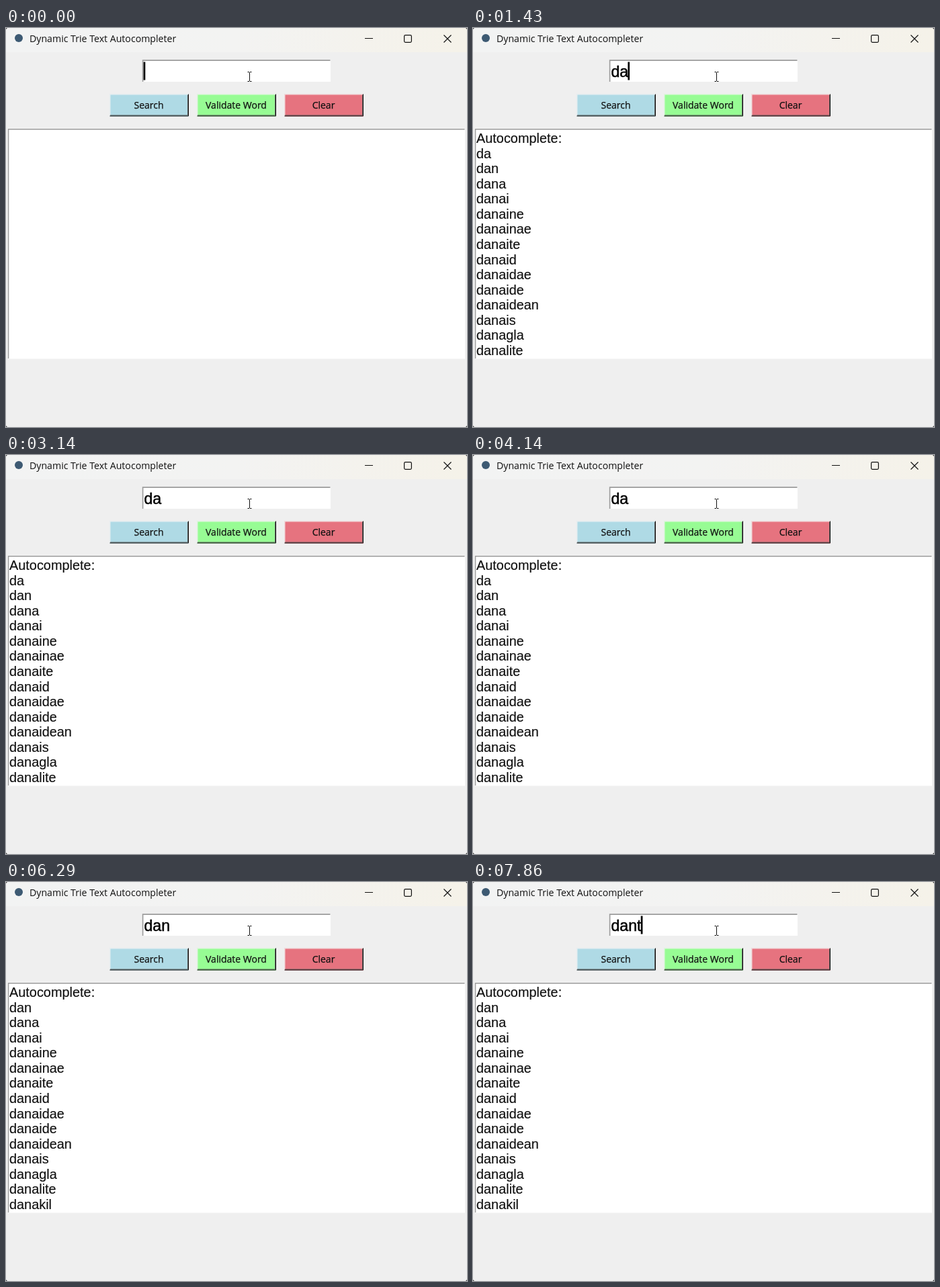
Recreate the animation shown at these times as an HTML page. Size 686 by 594 pixels, loop 8000 ms.

```html
<!DOCTYPE html>
<html lang="en">
<head>
<meta charset="utf-8">
<title>Dynamic Trie Text Autocompleter</title>
<style>
  html, body { margin: 0; width: 100%; height: 100%; overflow: hidden; background: #efefef; }
  svg { display: block; width: 686px; height: 594px; }
  text { white-space: pre; }
  .ui { font: 14.15px "Open Sans", "Noto Sans", sans-serif; fill: #111; }
  .button { font-size: 14px; text-anchor: middle; stroke: #111; stroke-width: .25; }
  .typed { font: 23.2px "Liberation Sans", Arial, sans-serif; stroke: #000; stroke-width: .5; }
  .list { font: 19.9px "Liberation Sans", Arial, sans-serif; fill: #111; stroke: #111; stroke-width: .15; }
  .line { fill: none; stroke: #111; stroke-width: 1.2; }
</style>
</head>
<body>
<svg viewBox="0 0 686 594">
  <defs>
    <linearGradient id="bar">
      <stop offset="0" stop-color="#f2f3f3"/>
      <stop offset=".5" stop-color="#f3f3f2"/>
      <stop offset="1" stop-color="#f5f2e9"/>
    </linearGradient>
  </defs>
  <rect width="686" height="594" fill="#efefef"/>
  <rect width="686" height="36" fill="url(#bar)"/>
  <path d="M0 592v2h2zM686 592v2h-2zM0 0h2l-2 2zM686 0h-2l2 2z" fill="#444"/>

  <circle cx="19" cy="15" r="6" fill="#3d5a73"/>
  <text class="ui" x="35" y="21">Dynamic Trie Text Autocompleter</text>
  <path class="line" d="M534 15.5h12M651.5 10.5l11 11M662.5 10.5l-11 11"/>
  <rect class="line" x="592.6" y="10.6" width="10.8" height="10.8" rx="1.8"/>

  <rect x="203" y="47" width="280" height="33" fill="#fff"/>
  <path d="M203.6 80V48.1H482.5" fill="none" stroke="#9a9a9a" stroke-width="1.6"/>
  <text id="typed" class="typed" x="205.4" y="72.6"></text>
  <rect id="caret" y="50.5" width="2.7" height="27"/>

  <g id="buttons"></g>

  <rect x="3" y="150" width="680" height="342.5" fill="#fff"/>
  <path d="M3.6 492V150.8H682.5" fill="none" stroke="#9c9c9c" stroke-width="1.4"/>
  <g id="list"></g>

  <path d="M359.5 65.5h2.5m1 0h2.5M362.5 66v13M359.5 79.5h2.5m1 0h2.5" fill="none" stroke="#111"/>
</svg>
<script>
const LOOP = 8000;
const byId = id => document.getElementById(id);
const typed = byId("typed"), caret = byId("caret"), list = byId("list");

const stem = "da dan dana danai danaine danainae danaite danaid danaidae danaide danaidean danais danagla danalite danakil".split(" ");
const wordLists = {
  "": [],
  d: "d di dis diss dissert dissertator dissertate dissertation dissertational dissertationist dissertative disserve disservice disserviceable".split(" "),
  da: stem.slice(0, 14),
  dan: stem.slice(1)
};

// The list follows each keystroke after a short delay.
const entrySteps = [[0, ""], [290, "d"], [1140, "da"], [4430, "dan"], [7720, "dant"]];
const listSteps = [[0, ""], [430, "d"], [1290, "da"], [4570, "dan"]];
const caretOff = [[3000, 3300], [3900, 4200], [5240, 5540], [6140, 6440], [7040, 7340]];

const valueAt = (steps, t) => steps.filter(([start]) => start <= t).pop()[1];

function drawButton(x, label, color) {
  const top = 98.5, right = x + 118, bottom = 131.5;
  const edge = (d, stroke) => `<path d="${d}" fill="none" stroke="${stroke}"/>`;
  return `<rect x="${x + .5}" y="${top}" width="117.5" height="33" fill="${color}"/>
    ${edge(`M${x + .9} ${bottom}V${top + .4}H${right}`, "#f4f4f4")}
    ${edge(`M${x + 1} ${bottom - 1.5}H${right - 1.5}V${top + 1}`, "#5c5c5c")}
    ${edge(`M${x + .5} ${bottom - .5}H${right - .5}V${top}`, "#111")}
    <text class="ui button" x="${x + 58.5}" y="120">${label}</text>`;
}

byId("buttons").innerHTML =
  drawButton(154, "Search", "#afdae5") +
  drawButton(284, "Validate Word", "#97fc94") +
  drawButton(414, "Clear", "#e6737f");

let shownPrefix = "";
function showList(prefix) {
  if (prefix === shownPrefix) return;
  shownPrefix = prefix;
  const lines = prefix ? ["Autocomplete:", ...wordLists[prefix]] : [];
  list.innerHTML = lines.map((line, i) =>
    `<text class="list" x="5" y="${171.3 + i * 22.53}">${line}</text>`).join("");
}

function render(t) {
  const entry = valueAt(entrySteps, t);
  if (typed.textContent !== entry) typed.textContent = entry;
  caret.setAttribute("x", 204.6 + (entry ? typed.getComputedTextLength() : 0));
  const hidden = caretOff.some(([start, end]) => t >= start && t < end);
  caret.setAttribute("visibility", hidden ? "hidden" : "visible");
  showList(valueAt(listSteps, t));
}

const begin = performance.now();
function tick() {
  render((performance.now() - begin) % LOOP);
  requestAnimationFrame(tick);
}
tick();
</script>
</body>
</html>
```
